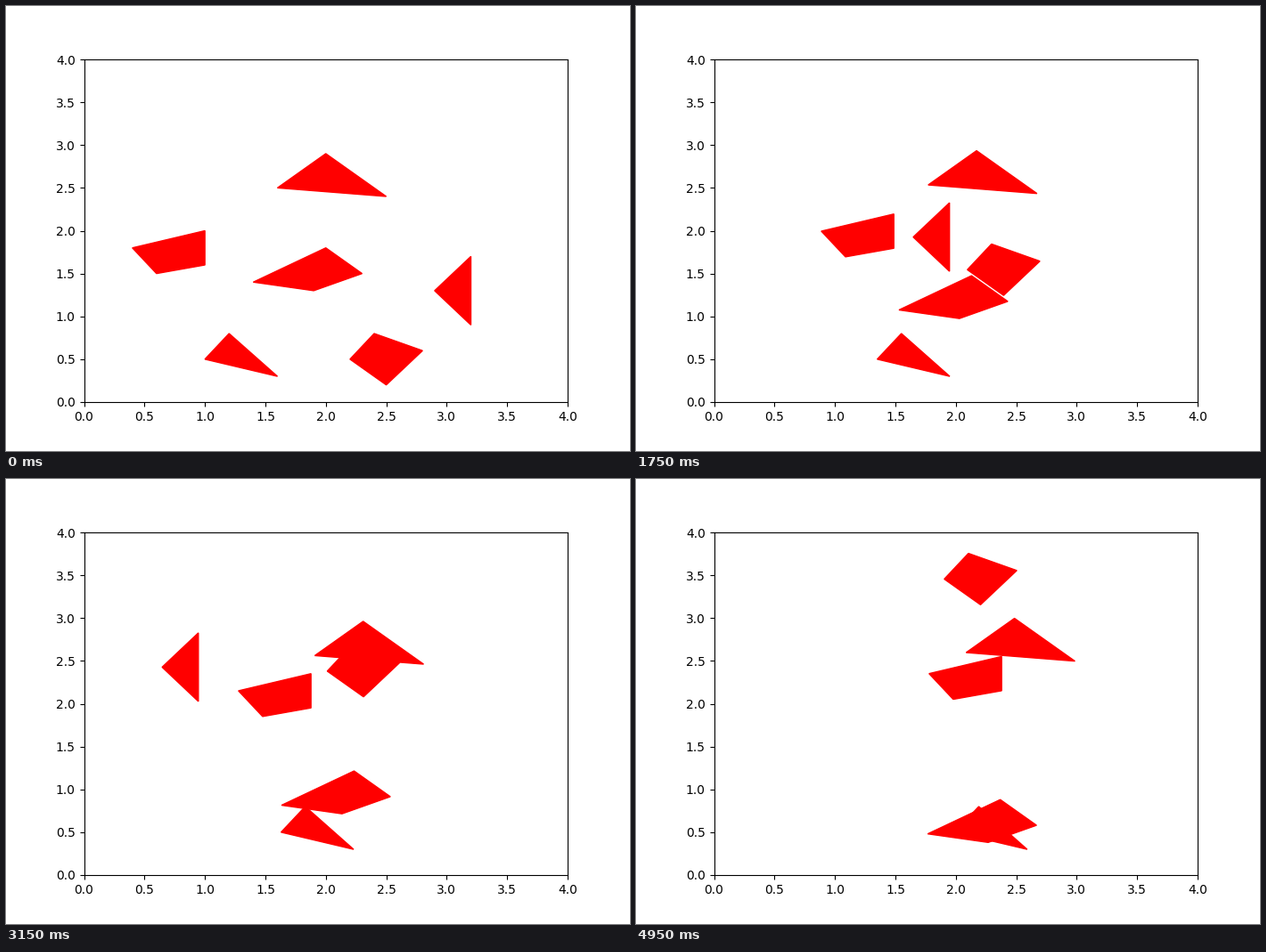
These frames come from a looping animation (700 by 500 pixels, 5000 ms). A matplotlib script:

```python
import numpy as np
import matplotlib.pyplot as plt
from matplotlib.animation import FuncAnimation
from matplotlib.patches import Polygon

FRAMES = 100
INTERVAL = 50

plt.rcParams["font.family"] = "DejaVu Sans"
fig, ax = plt.subplots(figsize=(7, 5), dpi=100)
ax.set(xlim=(0, 4), ylim=(0, 4))


class Drifter:
    """A red polygon gliding at constant speed along a heading."""

    def __init__(self, *corners, heading, speed):
        self.corners = np.array(corners)
        self.step = speed * np.array(heading) / np.hypot(*heading)
        self.patch = Polygon(self.corners, color="red", linewidth=1,
                             joinstyle="bevel")
        ax.add_patch(self.patch)

    def move(self, frame):
        self.patch.set_xy(self.corners + frame * self.step)
        return self.patch


drifters = [
    Drifter((0.4, 1.8), (1.0, 2.0), (1.0, 1.6), (0.6, 1.5),
            heading=(5, 2), speed=0.015),
    Drifter((1.0, 0.5), (1.2, 0.8), (1.6, 0.3),
            heading=(1, 0), speed=0.01),
    Drifter((1.4, 1.4), (2.0, 1.8), (2.3, 1.5), (1.9, 1.3),
            heading=(2, -5), speed=0.01),
    Drifter((1.6, 2.5), (2.0, 2.9), (2.5, 2.4),
            heading=(5, 1), speed=0.005),
    Drifter((2.2, 0.5), (2.4, 0.8), (2.8, 0.6), (2.5, 0.2),
            heading=(-1, 10), speed=0.03),
    Drifter((2.9, 1.3), (3.2, 1.7), (3.2, 0.9),
            heading=(-2, 1), speed=0.04),
]


def update(frame):
    return [drifter.move(frame) for drifter in drifters]


anim = FuncAnimation(fig, update, frames=FRAMES, interval=INTERVAL,
                     repeat=True, repeat_delay=0)
plt.show()
```
